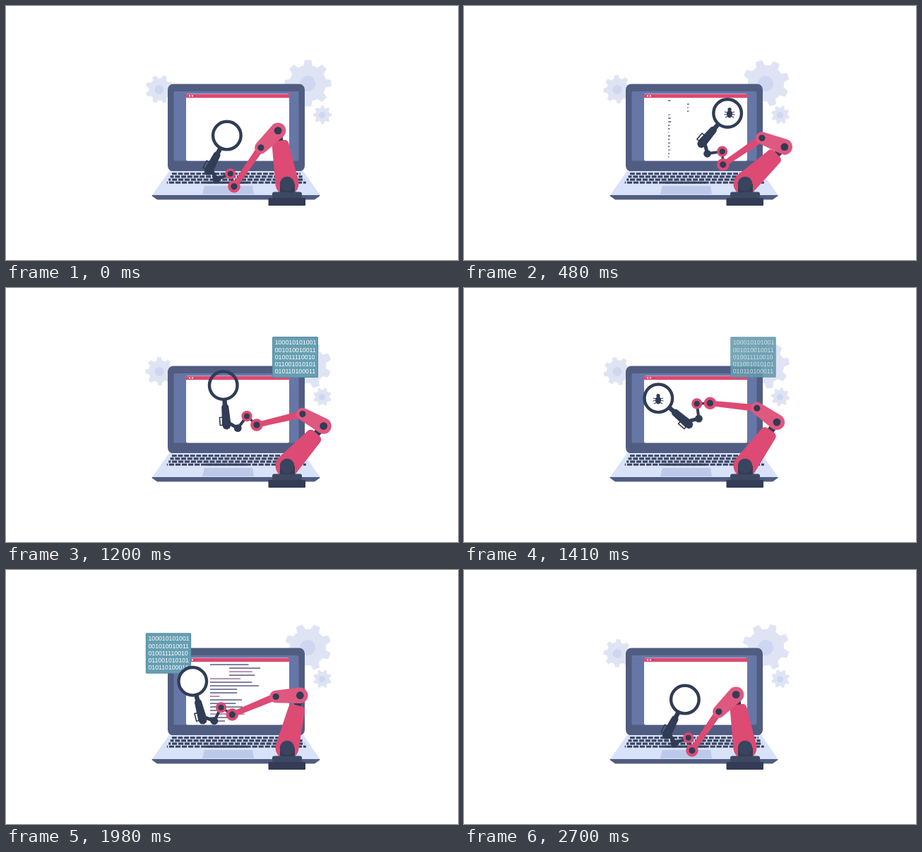
Recreate the animation shown at these times as an HTML page with a canvas. Size 640 by 360 pixels, loop 2.73 s.

```html
<!DOCTYPE html>
<html lang="en">
<head>
<meta charset="utf-8">
<title>Robot arm inspecting code</title>
<style>
html, body { margin: 0; width: 100%; height: 100%; overflow: hidden; background: #fff; }
canvas { display: block; width: 640px; height: 360px; }
</style>
</head>
<body>
<canvas id="stage" width="640" height="360"></canvas>
<script>
const ctx = document.getElementById('stage').getContext('2d');
const LOOP = 2730, STEP = 30, TAU = Math.PI * 2, RAD = Math.PI / 180;
const DARK = '#313c55', SLATE = '#505d81', PINK = '#dd4a73', ROSE = '#df587f';
const PALE = '#dfe4f5', SOFT = '#cfd7f0';

// Absolute angles: lower arm, upper arm, forearm, wrist, gripper, lens
const REST = [-99.7, 135, 124.6, 254, 158, -76.6];
const RIGHT = [-40.8, 204.3, 146.5, 267, 172, -63];
const LEFT = [-54.6, 215.5, 187.8, 174, 79, -157];
const LENGTHS = [76.5, 34.3, 66.8, 18.7, 21.3, 64];
const BASE = [398, 252];
const MOVES = [[0, REST, RIGHT], [930, RIGHT, LEFT], [1713, LEFT, REST]];
const MOVE_TIME = 550;

// Code lines: left edge, width
const LINES = [[289, 57], [316, 46], [316, 34], [316, 38], [289, 45], [289, 62], [289, 72],
  [289, 40], [289, 40], [289, 14], [289, 47], [289, 38], [289, 48], [289, 38], [289, 51],
  [289, 31], [289, 22]];
const BITS = ['100010101001', '001010010011', '010011110010', '011001010101', '010110100011'];

// at: lens arrives; type, clear: code lines; leave: card fades
const SCENES = [
  { at: 550, type: 465, clear: 1050, leave: 1380, card: [409.5, 98], bug: [376, 152] },
  { at: 1490, type: 1655, clear: 2200, leave: 2270, card: [230, 118], bug: [275, 158] }
];

const clamp = v => Math.max(0, Math.min(1, v));
const ramp = (t, from, span) => clamp((t - from) / span);
const ease = u => (1 - Math.cos(Math.PI * u)) / 2;
const easeOut = u => Math.sin(u * Math.PI / 2);

function fill(color) { ctx.fillStyle = color; ctx.fill(); }

function disc(x, y, r, color) {
  ctx.beginPath();
  ctx.arc(x, y, r, 0, TAU);
  fill(color);
}

function poly(points, color) {
  ctx.beginPath();
  points.forEach(p => ctx.lineTo(p[0], p[1]));
  ctx.closePath();
  fill(color);
}

function box(x, y, w, h, r, color) {
  ctx.beginPath();
  ctx.roundRect(x, y, w, h, r);
  fill(color);
}

function line(a, b, width, color, cap = 'butt') {
  ctx.beginPath();
  ctx.moveTo(a[0], a[1]);
  ctx.lineTo(b[0], b[1]);
  ctx.lineWidth = width;
  ctx.lineCap = cap;
  ctx.strokeStyle = color;
  ctx.stroke();
}

function within(x, y, turn, draw) {
  ctx.save();
  ctx.translate(x, y);
  ctx.rotate(turn);
  draw();
  ctx.restore();
}

// Tapered limb between two joints
function limb(a, b, ra, rb, color) {
  const dir = Math.atan2(b[1] - a[1], b[0] - a[0]);
  ctx.beginPath();
  ctx.arc(a[0], a[1], ra, dir + Math.PI / 2, dir - Math.PI / 2);
  ctx.arc(b[0], b[1], rb, dir - Math.PI / 2, dir + Math.PI / 2);
  ctx.closePath();
  fill(color);
}

function gear(x, y, r, hub, turn) {
  within(x, y, turn, () => {
    disc(0, 0, r * 0.78, PALE);
    for (let i = 0; i < 8; i++) {
      ctx.rotate(TAU / 8);
      poly([[-r * 0.2, -r * 0.7], [-r * 0.14, -r], [r * 0.14, -r], [r * 0.2, -r * 0.7]], PALE);
    }
  });
  disc(x - 0.5, y + 0.5, hub, SOFT);
}

function laptop() {
  box(229, 110.5, 194, 124, 8, SLATE);
  box(237.5, 121, 177, 98.5, 2, '#6677a7');
  box(255, 124.5, 146, 95, 2, '#fff');
  ctx.fillStyle = PINK;
  ctx.fillRect(255, 124.8, 146, 5.4);
  disc(260, 127.4, 1.1, '#fff');
  disc(264, 127.4, 1.1, '#fff');
  disc(267.5, 127.4, 1, '#8d4a68');

  poly([[231, 234], [421, 234], [444.5, 268], [207, 268]], '#d8e2f9');
  poly([[206.5, 268], [444.5, 268], [444, 269.5], [437, 274.5], [214, 274.5], [207, 269.5]], SLATE);
  for (let i = 0; i < 4; i++) {
    const y = 237.7 + i * 4.2, x0 = 235 - i * 2.4, x1 = 417 + i * 2.6;
    ctx.setLineDash([6.8 + i * 0.15, 1.8]);
    ctx.lineDashOffset = i * 2;
    line([x0, y], [x1, y], 3.1, '#39435f');
  }
  ctx.setLineDash([]);
  line([283, 250.3], [342, 250.3], 3.1, '#39435f');
  poly([[281, 255], [349, 255], [351, 267], [278, 267]], '#bdc9e8');
}

function code(t, scene) {
  if (t < scene.type || t > scene.clear + 90) return;
  const grow = easeOut(ramp(t, scene.type, 400));
  ctx.globalAlpha = 1 - ramp(t, scene.clear, 90);
  LINES.forEach(([x, w], i) => {
    ctx.fillStyle = i % 5 === 4 || i === 2 ? '#a0688c' : '#4d4f78';
    ctx.fillRect(x, 133.4 + i * 5, w * grow, 1.4);
  });
  ctx.globalAlpha = 1;
}

function card(t, scene) {
  const alpha = ramp(t, scene.at + 40, 80) * (1 - ramp(t, scene.leave, 90));
  if (!alpha) return;
  const size = 0.83 + 0.17 * ramp(t, scene.at, 520);
  within(...scene.card, 0, () => {
    ctx.scale(size, size);
    ctx.globalAlpha = alpha;
    box(-32.5, -29, 65, 58, 1.5, '#5a8ea2');
    box(-31.5, -28, 63, 56, 1, '#669eb2');
    ctx.fillStyle = '#fff';
    ctx.font = '8.8px "Liberation Sans", Arial, sans-serif';
    ctx.textBaseline = 'middle';
    BITS.forEach((row, i) => ctx.fillText(row, -28.8, (i - 2) * 10.3 + 0.4));
  });
}

function bug(t, scene) {
  const alpha = ramp(t, scene.at - 250, 100) * (1 - ramp(t, scene.at, 185));
  if (!alpha) return;
  ctx.globalAlpha = alpha;
  within(...scene.bug, 0, () => {
    for (const side of [-1, 1]) {
      line([0, 0], [side * 7, -2], 1.2, DARK);
      line([0, 1], [side * 7.5, 2], 1.2, DARK);
      line([0, 3], [side * 6, 6], 1.2, DARK);
    }
    disc(0, -5.5, 2.6, DARK);
    ctx.beginPath();
    ctx.ellipse(0, 1, 4, 5.5, 0, 0, TAU);
    fill(DARK);
  });
  ctx.globalAlpha = 1;
}

function magnifier(t, lens, turn, grip) {
  within(...lens, turn, () => {
    poly([[20, -3.2], [27, -3.2], [30, -5], [56, -6.3], [61, -4.4], [63, 0],
      [61, 4.4], [56, 6.3], [30, 5], [27, 3.2], [20, 3.2]], DARK);
    ctx.lineWidth = 1.6;
    ctx.strokeStyle = DARK;
    ctx.strokeRect(45, 4, 11, 5);
    line([54, -4], grip, 5, DARK, 'round');
  });
  ctx.save();
  ctx.beginPath();
  ctx.arc(...lens, 20, 0, TAU);
  ctx.clip();
  // Clear glass until the lens reaches the left side
  if (t >= SCENES[1].at) disc(...lens, 20, '#fff');
  SCENES.forEach(s => {
    const tint = ramp(t, s.at, 100) * (1 - ramp(t, s.at + 170, 90));
    ctx.globalAlpha = tint;
    if (tint) disc(...lens, 19, '#e8ebf5');
    ctx.globalAlpha = 1;
    bug(t, s);
  });
  ctx.restore();
  ctx.beginPath();
  ctx.arc(...lens, 19.8, 0, TAU);
  ctx.lineWidth = 4.4;
  ctx.strokeStyle = DARK;
  ctx.stroke();
}

function poseAt(t) {
  const [start, from, to] = MOVES.filter(m => m[0] <= t).pop();
  const u = ease(ramp(t, start, MOVE_TIME));
  return from.map((a, i) => (a + (to[i] - a) * u) * RAD);
}

function arm(t) {
  const pose = poseAt(t);
  const joints = [BASE];
  pose.forEach((a, i) => {
    const [x, y] = joints[i];
    joints.push([x + Math.cos(a) * LENGTHS[i], y + Math.sin(a) * LENGTHS[i]]);
  });
  const [, shoulder, elbow, wrist, knuckle, grip, lens] = joints;

  line(knuckle, grip, 4, DARK, 'round');
  disc(...grip, 5.4, DARK);
  magnifier(t, lens, pose[5] + Math.PI + 14 * RAD, [62, -15.5]);

  within(...BASE, pose[0], () => {
    line([56, 0], [72, 0], 10, DARK);
    ctx.beginPath();
    ctx.moveTo(0, -16.5);
    ctx.arcTo(62, -11.5, 62, 0, 6);
    ctx.arcTo(62, 11.5, 0, 16.5, 6);
    ctx.lineTo(0, 16.5);
    ctx.arc(0, 0, 16.5, Math.PI / 2, -Math.PI / 2);
    fill(PINK);
  });

  line(wrist, knuckle, 3.4, DARK);
  limb(elbow, wrist, 5, 3.8, PINK);
  limb(shoulder, elbow, 11.2, 8.8, ROSE);
  disc(...wrist, 8.8, PINK);
  disc(...knuckle, 7.6, PINK);
  disc(...shoulder, 5.4, DARK);
  disc(...elbow, 4.6, DARK);
  disc(...wrist, 4.6, DARK);
  disc(...knuckle, 4, DARK);

  box(377, 263.5, 42, 9, 3, '#3d4862');
  box(388, 252, 21, 12, 1, '#323c54');
  disc(...BASE, 10.3, '#39445e');
  box(371.5, 272, 52.5, 11, 1, '#333c54');
}

function draw(t) {
  ctx.clearRect(0, 0, 640, 360);
  const turn = t / 1000 * 57 * RAD;
  gear(427.5, 109.5, 33, 11, turn);
  gear(217.5, 118, 20, 6.5, 22 * RAD - turn);
  gear(448, 154.3, 13, 4.5, -turn);
  laptop();
  SCENES.forEach(s => code(t, s));
  SCENES.forEach(s => card(t, s));
  arm(t);
}

const began = performance.now();
function tick() {
  const t = (performance.now() - began) % LOOP;
  draw(Math.floor(t / STEP) * STEP);
  requestAnimationFrame(tick);
}
tick();
</script>
</body>
</html>
```
